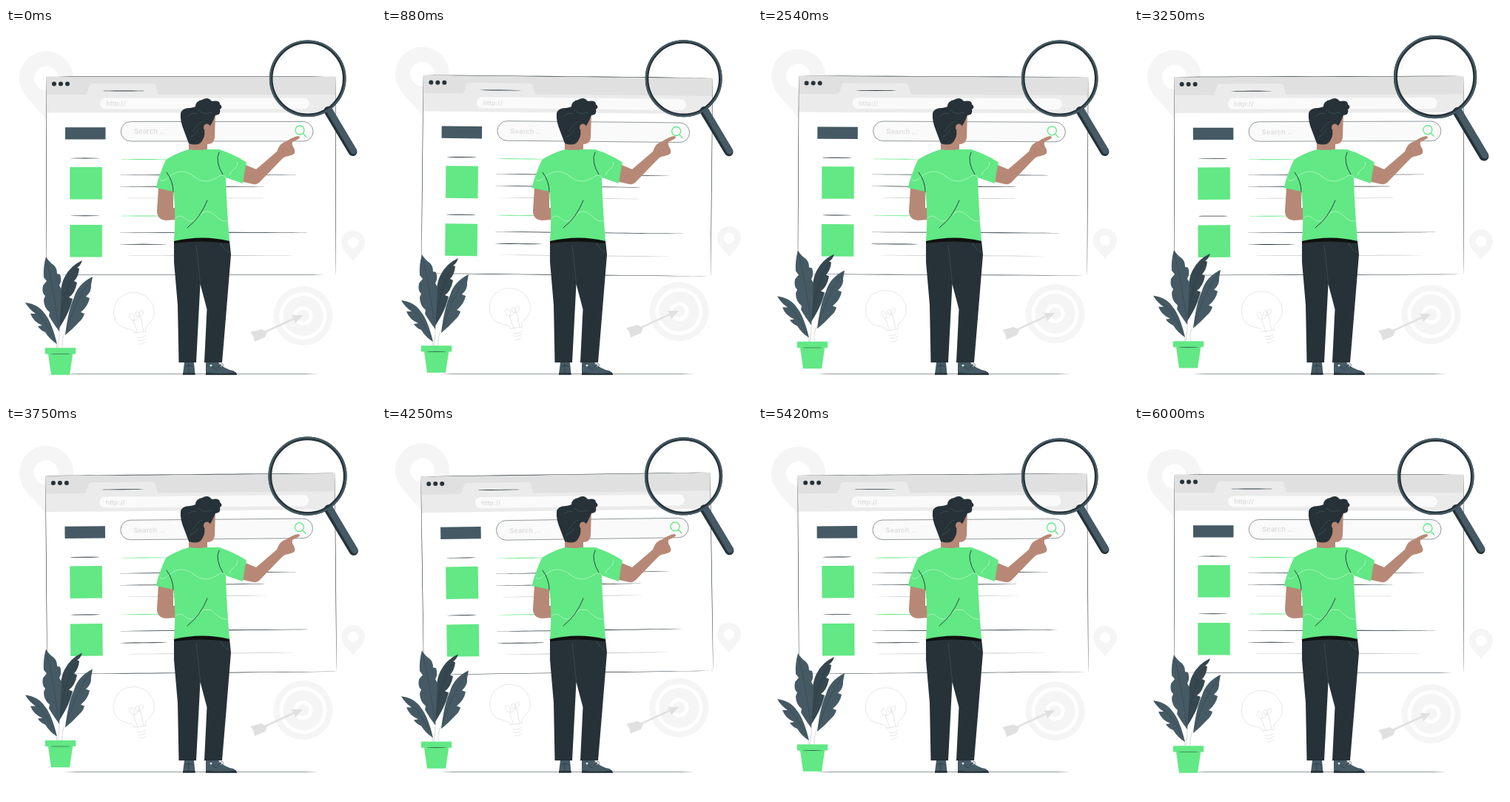
Recreate the animation shown at these times as an HTML page. Size 500 by 500 pixels, loop 6040 ms.

```html
<!DOCTYPE html>
<html lang="en">
<head>
<meta charset="utf-8">
<style>
html, body { margin: 0; width: 100%; height: 100%; overflow: hidden; background: #fff; }
svg { display: block; width: 100%; height: 100%; }
text { font-family: Inter, "Open Sans", sans-serif; font-weight: 700; fill: #e0e0e0; }
.green { fill: #62e884; }
.slate { fill: #455a64; }
.dark { fill: #263238; }
.skin { fill: #b78876; }
.pale { fill: #f5f5f5; }
.line { fill: none; stroke-width: .6; stroke-linecap: round; stroke-linejoin: round; }
</style>
</head>
<body>
<svg viewBox="0 0 500 500">
  <defs>
    <path id="pin" fill-rule="evenodd" d="M0 57C-9 40-36.5 25-36.5 0A36.5 36.5 0 0 1 36.5 0C36.5 25 9 40 0 57ZM-16.5 0A16.5 16.5 0 0 0 16.5 0A16.5 16.5 0 0 0-16.5 0Z"/>
  </defs>

  <g id="floor"></g>

  <g id="icons">
    <use href="#pin" class="pale" x="54.5" y="68"/>
    <use href="#pin" class="pale" transform="translate(469 290) scale(.44)"/>
    <g class="line" stroke="#e0e0e0" style="stroke-width:.8">
      <path d="M174 412C172 406 163 407 155 403C142 395 143 374 154 364C168 353 188 357 196 370C204 383 200 393 193 400C188 404 188 407 189 410"/>
      <path d="M174 412L189 410M177 418Q184 420 189 415M178 422Q185 424 189 419M180 427Q185 428 188 424"/>
      <path d="M178 412L172 395C164 393 166 384 170 386C175 388 174 395 172 395C177 396 182 389 179 384C175 382 173 388 177 390C182 392 187 387 185 382C180 380 179 388 182 391L186 410"/>
    </g>
    <g class="pale">
      <circle cx="401.5" cy="389" r="40"/>
      <circle cx="401.5" cy="389" r="32" fill="#fff"/>
      <circle cx="401.5" cy="389" r="27"/>
      <circle cx="401.5" cy="389" r="13" fill="#fff"/>
      <circle cx="401.5" cy="389" r="8"/>
    </g>
    <path d="M345 413L392 391.500" stroke="#e0e0e0" stroke-width="2.500"/>
    <path fill="#e0e0e0" d="M401 388L386 388L389 392L391 399ZM330 411L345 407L353 411L350 418L336 424L334 416Z"/>
  </g>

  <g id="browser">
    <path fill="#fff" d="M54.500 65.500H445.500V333.500H54.500Z"/>
    <path fill="#e0e0e0" d="M54.500 65.500H445.500V91H54.500Z"/>
    <path fill="#ebebeb" d="M54.500 90H108Q110 88 112 79Q113 75 117 75H198Q202 75 203 79L206 90H445.500V114.500H54.500Z"/>
    <g class="dark">
      <circle cx="65" cy="75.500" r="3"/>
      <circle cx="74" cy="75.500" r="3"/>
      <circle cx="83" cy="75.500" r="3"/>
    </g>
    <rect x="127" y="94.500" width="283" height="15" rx="7.500" fill="#fafafa"/>
    <text x="135.500" y="105.300" font-size="8.500">http://</text>
    <rect class="slate" x="80" y="134.300" width="54.500" height="16.300"/>
    <rect x="155.300" y="126.500" width="259.700" height="26.500" rx="13.200" fill="#fafafa" stroke="#263238" stroke-width=".5"/>
    <text x="173" y="143.500" font-size="9.300">Search ...</text>
    <path class="line" stroke="#62e884" style="stroke-width:1.300" d="M391 138A6 6 0 0 1 403 138A6 6 0 0 1 391 138M401.500 142.500L405.500 147"/>
    <rect class="green" x="86.300" y="188" width="43.500" height="43.500"/>
    <rect class="green" x="86.300" y="266" width="43.500" height="43.500"/>
  </g>

  <g id="glass">
    <path class="line" stroke="#e0e0e0" d="M365 59Q370 34 393 25"/>
    <path stroke="#263238" stroke-width="12" stroke-linecap="round" d="M435.500 112L468.500 167"/>
    <path stroke="#455a64" stroke-width="8.500" stroke-linecap="round" d="M437 111L469.700 166"/>
    <circle cx="407.700" cy="68.300" r="49.500" fill="none" stroke="#263238" stroke-width="4.600"/>
    <circle cx="407.700" cy="68.300" r="50.600" fill="none" stroke="#455a64" stroke-width="2.300"/>
  </g>

  <g id="plant">
    <path class="line" stroke="#b5bec2" d="M72 404Q73 418 70 432M80 411Q75 420 76 432M66 420L69 432"/>
    <path fill="#37474f" d="M103 314Q87 321 79 337Q71 351 71 407Q82 390 86 379Q89 370 90 366L85 364Q93 359 96 344L92 342Q98 336 99 325L96 324Q101 321 103 314Z"/>
    <path class="slate" d="M54 309Q50 323 51 337L55 342L50 348Q48 358 53 362L51 367Q51 378 59 384L58 389Q63 398 72 410Q74 385 75 353L72 348Q76 341 73 333L69 332Q69 324 64 320Q58 316 54 309Z"/>
    <path class="slate" d="M117 336Q97 346 92 364Q84 381 80 415Q90 407 99 397Q104 393 106 386L101 384Q111 376 113 365L108 363Q116 356 115 347Z"/>
    <path class="slate" d="M26 371Q44 373 53 387Q62 398 69 427Q59 421 53 411Q46 408 43 403L49 402Q37 397 33 386L40 386Q31 380 26 371Z"/>
    <path class="line" stroke="#263238" stroke-opacity=".5" d="M55 314Q64 350 71 404M101 317Q80 345 73 397M115 339Q93 369 82 409M29 373Q51 388 66 421"/>
    <path class="green" d="M52.800 432.300H94.200V440.500H90.200L86 468.700H61L57 440.500H52.800Z"/>
  </g>

  <g id="man">
    <path class="skin" d="M206 215Q205 232 204 247Q204 259 216 260L230 259V243H226L226 220ZM247 150H272V168H247ZM319 183L338 191L366 167Q370 155 379 153Q388 147 395 146Q399 147 395 150L387 154Q386 158 389 162Q392 169 388 171L382 173Q376 173 371 179L344 207Q340 212 334 211L316 207Z"/>
    <path class="skin" d="M283 112L282 148Q281 157 272 157L255 158L265 120Z"/>
    <path class="dark" d="M283 118L278 129Q276 131 275 135L268 139Q270 145 264 154Q259 160 247 156L241 140Q235 126 236 116Q237 108 249 108Q255 107 256 106Q256 99 265 97Q273 92 278 99Q289 97 289 103Q294 107 289 110Q291 117 283 118Z"/>
    <ellipse class="skin" cx="271.500" cy="134.500" rx="4.500" ry="5"/>
    <path class="line" stroke="#455a64" d="M260 111Q266 118 278 114M246 119Q252 113 258 116M253 139Q258 130 265 127M249 147Q256 145 259 139"/>

    <path class="dark" d="M227 287H302L304 306L296 404L292 452H268L271.500 380L262.500 346L257 452H233.500L232 374L227 316Z"/>
    <path fill="#111" d="M227 286Q264 279 302 286L301 291Q264 286 227 291Z"/>
    <path class="line" stroke="#455a64" d="M257 294Q260 318 262.500 345M290 291Q294 299 301 303"/>

    <path class="green" d="M247 164Q259 166 271 164H288Q309 171 325 181.500Q322 195 320 210L297 202Q298 241 302 288Q266 279 227 288Q230 248 226 221L202.500 216Q207 198 216 178Q230 169 247 164Z"/>
    <g class="line" stroke="#fff" stroke-opacity=".75">
      <path d="M208 205C214 212 221 195 236 194S257 208 271 207S291 193 297 202M313 181C313 192 304 190 302 199"/>
      <path d="M229 257C238 249 241 260 249 261S262 247 273 248S284 262 299 261"/>
    </g>
    <path class="line" stroke="#263238" style="stroke-width:.9" d="M288 168Q282 180 293 198M217 195Q226 207 226 221M245 270Q263 256 272 233"/>

    <path class="slate" d="M241 452H254L255.500 468H239ZM270 452H287Q295 461 307 463Q312 466 312 468.500H270Z"/>
    <path class="dark" d="M239 466H255.500V468.700H239ZM270 465.500Q290 468 311 465.500L312 468.700H270Z"/>
    <path class="line" stroke="#263238" d="M242 458Q247 454 253 458M247 456V466M276 453Q278 460 285 462M286 459L292 453L294 456L289 460"/>
    <circle cx="277" cy="456" r="1.500" fill="#e0e0e0"/>
    <path class="line" stroke="#fff" d="M288 455L291 453M290 458L293 456"/>
  </g>
</svg>
<script>
const LOOP = 6040, CYCLE = 6000, BEAT = 3000;
const get = id => document.getElementById(id);
const [icons, browser, glass, plant] = ['icons', 'browser', 'glass', 'plant'].map(get);

// Hairline that thins out at both ends
function hairline(parent, x1, y1, x2, y2, color = '#263238', half = .32) {
  const e = document.createElementNS('http://www.w3.org/2000/svg', 'ellipse');
  const attrs = {
    cx: (x1 + x2) / 2, cy: (y1 + y2) / 2,
    rx: (x2 - x1) / 2 || half, ry: (y2 - y1) / 2 || half, fill: color
  };
  for (const k in attrs) e.setAttribute(k, attrs[k]);
  parent.append(e);
}

hairline(get('floor'), 64, 467.5, 436, 467.5);
hairline(plant, 60, 440.5, 87, 440.5);

const GREEN = '#62e884', GREY = '#c7c7c7';
[
  [131, 187, 85], [87, 127, 176], [87, 127, 253.7],
  [155, 218, 177.5, GREEN], [153, 393, 198.3], [153, 350, 214.3], [160, 352, 230, GREY],
  [155, 218, 254, GREEN], [153, 408, 276.3], [153, 218, 292.3], [160, 390, 307.5, GREY]
].forEach(([x1, x2, y, color]) => hairline(browser, x1, y, x2, y, color, .45));

hairline(browser, 54.5, 65.5, 445.5, 65.5);
hairline(browser, 54.5, 333.5, 445.5, 333.5);
hairline(browser, 54.5, 65.5, 54.5, 333.5);
hairline(browser, 445.5, 65.5, 445.5, 333.5);

// Linear interpolation through [position, value] stops, position in 0..1
function tween(p, stops) {
  const i = Math.max(1, stops.findIndex(s => s[0] >= p));
  const [a, va] = stops[i - 1], [b, vb] = stops[i];
  return va + (vb - va) * (p - a) / (b - a);
}

const FLOAT = [[0, 0], [.5, -10], [1, 0]];
const SWAY = [[0, 0], [.25, 1], [.75, -1], [1, 0]];
const PULSE = [[0, 1], [.1, 1.1], [.3, 1], [.4, 1], [.5, 1.1], [.6, 1], [1, 1]];

function draw() {
  const t = performance.now() % LOOP % CYCLE;
  const slow = t / CYCLE, fast = t % BEAT / BEAT;
  const set = (el, value) => el.setAttribute('transform', value);
  set(icons, `translate(0 ${tween(fast, FLOAT)})`);
  set(plant, `translate(0 ${tween(slow, FLOAT)})`);
  set(browser, `rotate(${tween(slow, SWAY)} 250 199.5)`);
  set(glass, `translate(415 94.5) scale(${tween(fast, PULSE)}) translate(-415 -94.5)`);
  requestAnimationFrame(draw);
}
draw();
</script>
</body>
</html>
```
